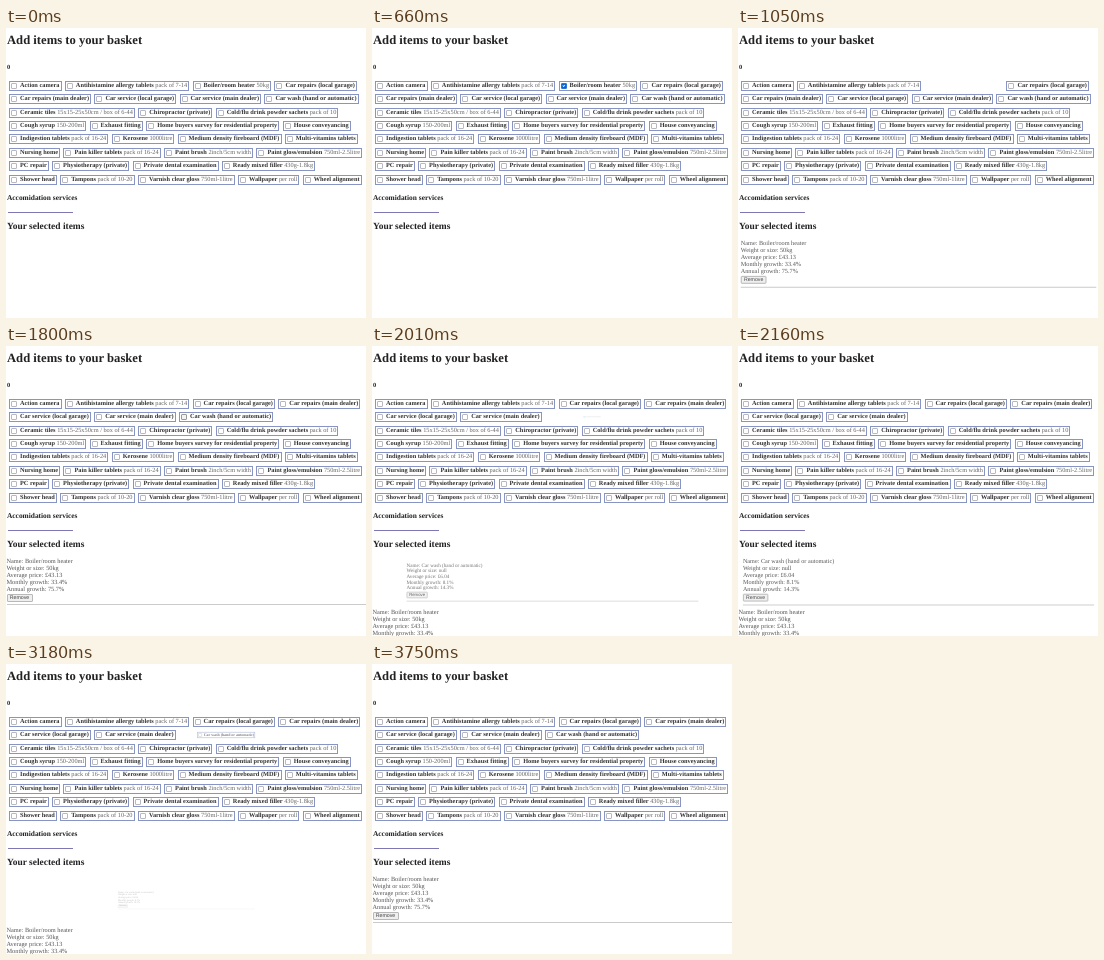
An HTML page for the animation above (4.29 s loop, 360 by 290 pixels).

```html
<!DOCTYPE html>
<html lang="en">
<head>
<meta charset="utf-8">
<title>Basket</title>
<style>
  html, body { margin: 0; width: 100%; height: 100%; overflow: hidden; background: #fff; }
  #stage {
    position: relative; width: 360px; height: 290px; overflow: hidden; background: #fff;
    font: 6.32px/10px "Liberation Serif", "Times New Roman", serif; color: #222;
    text-rendering: geometricPrecision; white-space: nowrap;
  }
  h1, h2, h3, h4 { position: absolute; left: 1px; margin: 0; font-weight: bold; }
  h1 { top: 2px; font-size: 12.64px; line-height: 20px; }
  h4 { top: 35px; font-size: 6.32px; }
  h3 { top: 165px; font-size: 7.4px; }
  h2 { top: 193.5px; font-size: 9.45px; }
  #rule { position: absolute; left: 2px; top: 184px; width: 65px; height: 1px; background: #7d78b4; }
  #items {
    position: absolute; left: 3px; top: 53px; width: 357px;
    display: flex; flex-wrap: wrap; gap: 3.36px 3.3px;
  }
  .item {
    position: relative; box-sizing: border-box; height: 10px; line-height: 8px;
    padding: 0 1.1px 0 10px; border: 1px solid #8794c4; color: #666;
  }
  .item b { color: #333; }
  .item::before {
    content: ""; position: absolute; left: 1px; top: 1px; width: 6px; height: 6px;
    box-sizing: border-box; border: 1px solid #b8b8c0; border-radius: 1px; background: #fff;
  }
  .item.pressed::before { border-color: #999; background: #f2f2f2; }
  .item.checked::before { border-color: #2a75d8; background: #0b62d0; }
  .item.checked::after {
    content: ""; position: absolute; left: 3.1px; top: 1.9px; width: .6px; height: 1.8px;
    border: solid #fff; border-width: 0 1px 1px 0; transform: rotate(45deg) scale(.8);
  }
  .panel { position: absolute; left: .5px; top: 211.7px; width: 359px; height: 48px; line-height: 7.07px; color: #555; }
  .panel i {
    position: absolute; left: 0; top: 36px; width: 26px; height: 8.4px; box-sizing: border-box;
    border: 1px solid #b8b8b8; border-radius: 1px; background: #efefef; color: #444;
    font: 5.25px/6.4px "Liberation Sans", Arial, sans-serif; text-align: center;
  }
  .panel i.pressed { background: #f6f6f6; border-color: #ccc; }
  .panel u { position: absolute; left: 0; right: 0; top: 46.8px; height: 1px; background: #cbcbcb; }
</style>
</head>
<body>
<div id="stage">
  <h1>Add items to your basket</h1>
  <h4>0</h4>
  <div id="items"></div>
  <h3>Accomidation services</h3>
  <div id="rule"></div>
  <h2>Your selected items</h2>
</div>
<script>
const LOOP = 4290, FADE = 600, PITCH = 51;
const ADD_BOILER = 688, ADD_WASH = 1840, REMOVE_WASH = 3076;

const stock = `Action camera
Antihistamine allergy tablets|pack of 7-14
Boiler/room heater|50kg
Car repairs (local garage)
Car repairs (main dealer)
Car service (local garage)
Car service (main dealer)
Car wash (hand or automatic)
Ceramic tiles|15x15-25x50cm / box of 6-44
Chiropractor (private)
Cold/flu drink powder sachets|pack of 10
Cough syrup|150-200ml
Exhaust fitting
Home buyers survey for residential property
House conveyancing
Indigestion tablets|pack of 16-24
Kerosene|1000litre
Medium density fireboard (MDF)
Multi-vitamins tablets
Nursing home
Pain killer tablets|pack of 16-24
Paint brush|2inch/5cm width
Paint gloss/emulsion|750ml-2.5litre
PC repair
Physiotherapy (private)
Private dental examination
Ready mixed filler|430g-1.8kg
Shower head
Tampons|pack of 10-20
Varnish clear gloss|750ml-1litre
Wallpaper|per roll
Wheel alignment`.split("\n");

function add(parent, className, html) {
  const el = document.createElement("div");
  el.className = className;
  el.innerHTML = html;
  return parent.appendChild(el);
}

const stage = document.getElementById("stage");
const list = document.getElementById("items");
const items = stock.map(line => {
  const [name, size] = line.split("|");
  return add(list, "item", `<b>${name}</b>${size ? " " + size : ""}`);
});
const find = name => items[stock.findIndex(line => line.startsWith(name))];

const panel = (name, size, price, month, year) => add(stage, "panel",
  `Name: ${name}<br>Weight or size: ${size}<br>Average price: £${price}<br>` +
  `Monthly growth: ${month}%<br>Annual growth: ${year}%<i>Remove</i><u></u>`);

const boiler = find("Boiler"), wash = find("Car wash");
const boilerPanel = panel("Boiler/room heater", "50kg", "43.13", "33.4", "75.7");
const washPanel = panel("Car wash (hand or automatic)", "null", "6.04", "8.1", "14.3");
const removeButton = washPanel.querySelector("i");

const between = (t, from, to) => t >= from && t < to;

// quintic ease-out from 0 to 1
function grow(t, start) {
  const u = Math.min(1, Math.max(0, (t - start) / FADE));
  return 1 - (1 - u) ** 5;
}

function show(el, visible, k) {
  el.style.display = visible ? "" : "none";
  el.style.opacity = k;
  el.style.transform = k === 1 ? "none" : `scale(${k})`;
}

function render(t) {
  const washIn = grow(t, ADD_WASH), washOut = grow(t, REMOVE_WASH);
  const washK = t < REMOVE_WASH ? washIn : 1 - washOut;
  const hasWash = between(t, ADD_WASH, 3680);
  const boilerK = grow(t, ADD_BOILER);

  show(boiler, t < 1290, 1 - boilerK);
  show(wash, !between(t, 2480, REMOVE_WASH), 1 - washK);
  show(boilerPanel, t >= ADD_BOILER, boilerK);
  show(washPanel, hasWash, washK);
  boilerPanel.style.marginTop = (hasWash ? PITCH : 0) + "px";

  boiler.classList.toggle("checked", t >= 660);
  wash.classList.toggle("pressed", between(t, 1800, ADD_WASH));
  wash.classList.toggle("checked", between(t, ADD_WASH, REMOVE_WASH));
  removeButton.classList.toggle("pressed", between(t, 3030, REMOVE_WASH));
}

const begin = performance.now();
function tick() {
  render((performance.now() - begin) % LOOP);
  requestAnimationFrame(tick);
}
render(0);
requestAnimationFrame(tick);
</script>
</body>
</html>
```
